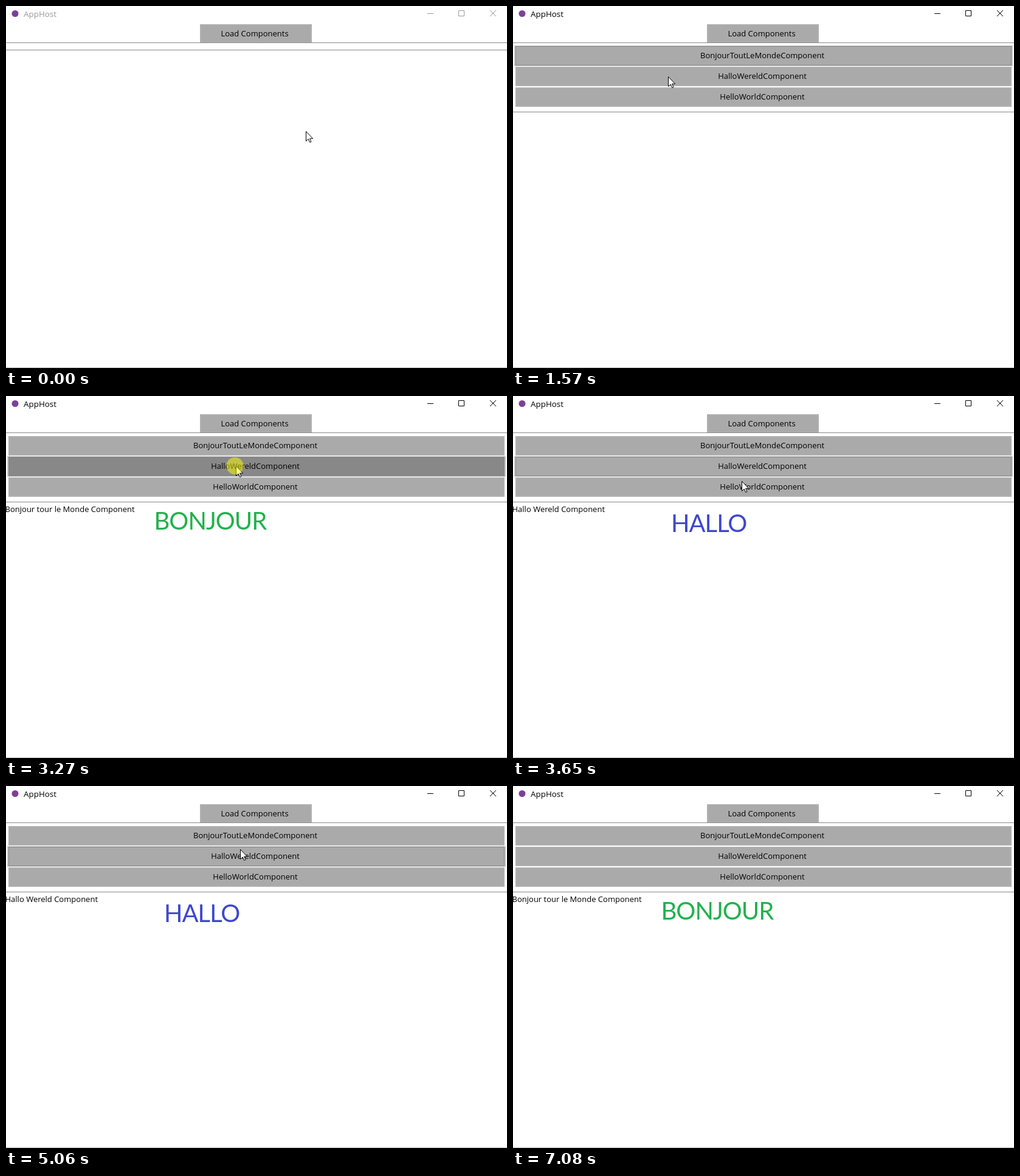
These frames come from a looping animation (824x596 px, 8090 ms). An HTML page with a canvas:

```html
<!DOCTYPE html>
<html lang="en">
<head>
<meta charset="utf-8">
<title>Component host</title>
<style>
  html, body { margin: 0; width: 100%; height: 100%; overflow: hidden; background: #fff; }
  canvas { display: block; }
</style>
</head>
<body>
<canvas id="stage" width="824" height="596"></canvas>
<script>
const ctx = document.getElementById('stage').getContext('2d');
const WIDTH = 824, HEIGHT = 596;
const LOOP = 8090;
const PRESS = 120;     // how long the mouse button stays down
const HOVER_LAG = 90;  // highlights trail the pointer

const loadButton = { label: 'Load Components', x: 319, y: 30, w: 184, h: 31 };
const itemButtons = ['BonjourToutLeMonde', 'HalloWereld', 'HelloWorld'].map((name, i) => (
  { label: name + 'Component', x: 4, y: 66 + 34 * i, w: 816, h: 32 }
));

const list = { loaded: true };
const bonjour = {
  loaded: true, caption: 'Bonjour tour le Monde Component', color: '#22b14c',
  words: [{ word: 'BONJOUR', x: 243.5, y: 220 }]
};
const hallo = {
  loaded: true, caption: 'Hallo Wereld Component', color: '#3f48cc',
  words: [{ word: 'HALLO', x: 260, y: 224 }]
};
const hello = {
  loaded: true, caption: 'Hello World Component', color: '#ed1c24',
  words: [{ word: 'HELLO', x: 260, y: 220 }, { word: 'WORLD', x: 262, y: 277 }]
};

// Where the pointer rests; a stop that opens something ends with a click
const stops = [
  { from: 0, to: 100, x: 493, y: 206 },
  { from: 640, to: 1180, x: 411, y: 33, opens: list },
  { from: 1570, to: 1570, x: 255, y: 116 },
  { from: 1800, to: 1890, x: 240, y: 198 },
  { from: 2350, to: 2500, x: 394, y: 81, opens: bonjour },
  { from: 2730, to: 3390, x: 378, y: 115, opens: hallo },
  { from: 3650, to: 4140, x: 376, y: 140, opens: hello },
  { from: 4230, to: 4870, x: 376, y: 126, opens: hallo },
  { from: 5220, to: 5440, x: 392, y: 85, opens: bonjour },
  { from: 5660, to: 6310, x: 408, y: 45 },
  { from: 6390, to: 6540, x: 409, y: 32, opens: bonjour },
  { from: 7080, to: LOOP, x: 850, y: 640 }
];

function pointerAt(t) {
  const i = Math.max(0, stops.findLastIndex(s => s.from <= t));
  const a = stops[i], b = stops[i + 1];
  if (!b || t <= a.to) return a;
  const k = (t - a.to) / (b.from - a.to);
  return { x: Math.round(a.x + (b.x - a.x) * k), y: Math.round(a.y + (b.y - a.y) * k) };
}

function contains({ x, y, w, h }, p) {
  return p.x >= x && p.x < x + w && p.y >= y && p.y < y + h;
}

function rect(x, y, w, h, color) {
  ctx.fillStyle = color;
  ctx.fillRect(x, y, w, h);
}

function disc(x, y, r, color) {
  ctx.fillStyle = color;
  ctx.beginPath();
  ctx.arc(x, y, r, 0, Math.PI * 2);
  ctx.fill();
}

function text(str, x, y, { color = '#000', font = '13px "Open Sans", sans-serif', align = 'left', spacing = 0 } = {}) {
  ctx.font = font;
  ctx.fillStyle = color;
  ctx.textAlign = align;
  ctx.letterSpacing = spacing + 'px';
  ctx.fillText(str, x, y);
}

function drawTitleBar(active) {
  const color = active ? '#000' : '#999';
  disc(15, 12.5, 5.5, '#7f3f98');
  text('AppHost', 29, 18, { color, font: '13.4px "Open Sans", sans-serif' });
  ctx.strokeStyle = color;
  ctx.lineWidth = 1;
  ctx.stroke(new Path2D('M693 12.5h10M744.5 7.5h9v9h-9zM796 7l10 10M806 7l-10 10'));
}

function drawButton(button, hovered, pressed) {
  const { label, x, y, w, h } = button;
  const edge = hovered ? 1 : 2;
  if (hovered && button !== loadButton) rect(x - 2, y - 1, w + 4, h + 2, '#c8c8c8');
  rect(x, y, w, h, hovered ? '#888' : '#b0b0b0');
  rect(x + edge, y + edge, w - 2 * edge, h - 2 * edge, hovered && pressed ? '#888' : '#aaa');
  text(label, x + w / 2 - 2, y + 20, { align: 'center' });
}

function drawPage({ caption, color, words }) {
  text(caption, -1.5, 191);
  for (const { word, x, y } of words)
    text(word, x, y, { color, spacing: -1, font: '40px Lato, sans-serif' });
}

const arrow = new Path2D('M.5 .5V16.5L4.2 13L6.7 18.5L9 17.5L6.6 12.2H11.6Z');

function drawPointer({ x, y }, pressed) {
  ctx.save();
  ctx.translate(x, y);
  ctx.fillStyle = '#fff';
  ctx.strokeStyle = '#000';
  ctx.fill(arrow);
  ctx.stroke(arrow);
  ctx.restore();
  if (pressed) disc(x - 1.5, y, 14, 'rgba(255, 255, 0, .5)');
}

function draw(t) {
  const clicks = stops.filter(s => s.opens);
  const page = clicks.findLast(s => s.to <= t)?.opens ?? {};
  const pressed = clicks.some(s => t >= s.to - PRESS && t < s.to);
  const highlight = pointerAt(t - HOVER_LAG);
  const visible = page.loaded ? [loadButton, ...itemButtons] : [loadButton];

  rect(0, 0, WIDTH, HEIGHT, '#fff');
  drawTitleBar(t >= clicks[0].to - PRESS);
  for (const button of visible) drawButton(button, contains(button, highlight), pressed);
  rect(0, 60, WIDTH, 1, '#888');
  rect(0, page.loaded ? 174 : 72, WIDTH, 1, '#888');
  rect(0, HEIGHT - 1, WIDTH, 1, '#bbb');
  if (page.words) drawPage(page);
  drawPointer(pointerAt(t), pressed);
}

const start = performance.now();
function frame() {
  draw((performance.now() - start) % LOOP);
  requestAnimationFrame(frame);
}
frame();
</script>
</body>
</html>
```
